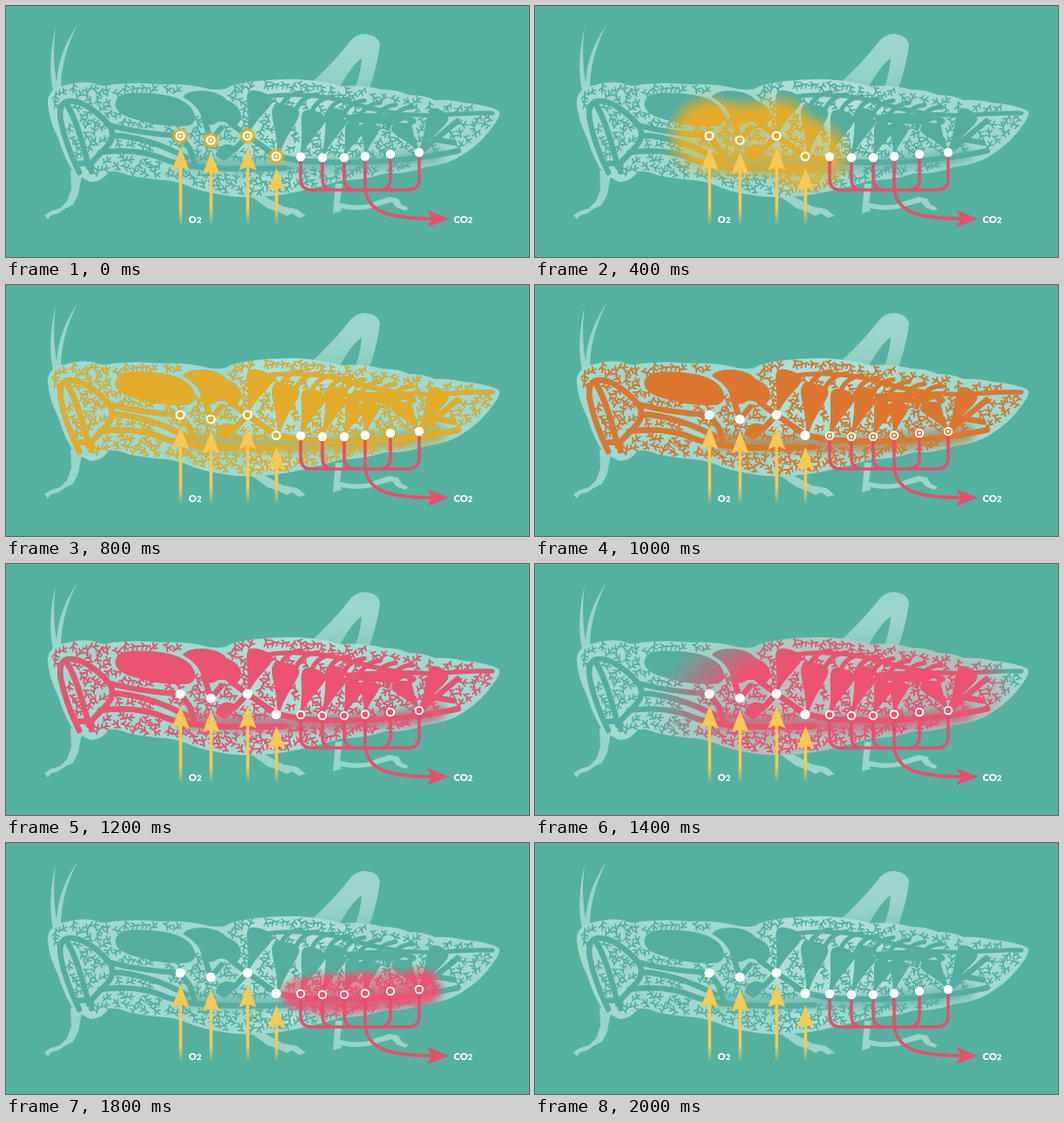
Write an HTML page that moves like this. It is 600 by 288 pixels and loops after 2100 ms.

```html
<!DOCTYPE html>
<html lang="en">
<head>
<meta charset="utf-8">
<title>Insect respiration</title>
<style>
html, body { margin: 0; width: 100%; height: 100%; overflow: hidden; background: #55b1a0; }
svg { display: block; }
text { font: 900 11.2px Lato, sans-serif; fill: #fff; }
tspan { font-size: 9.6px; }
#net { stroke-linecap: round; stroke-linejoin: round; }
#band { filter: blur(4px); }
</style>
</head>
<body>
<svg id="stage" width="600" height="288" viewBox="0 0 600 288">
  <defs>
    <radialGradient id="soft">
      <stop offset=".6" stop-color="#fff"/>
      <stop offset="1" stop-color="#fff" stop-opacity="0"/>
    </radialGradient>
    <linearGradient id="shaft" gradientUnits="userSpaceOnUse" x1="0" y1="232" x2="0" y2="250">
      <stop stop-color="#f8c953"/>
      <stop offset="1" stop-color="#f8c953" stop-opacity=".15"/>
    </linearGradient>
    <linearGradient id="thigh" gradientUnits="userSpaceOnUse" x1="0" y1="60" x2="0" y2="128">
      <stop stop-color="#9bd6cc"/>
      <stop offset="1" stop-color="#bfe7df" stop-opacity=".15"/>
    </linearGradient>
    <mask id="spread" maskUnits="userSpaceOnUse" x="0" y="0" width="600" height="288"></mask>
    <clipPath id="inBody"><use href="#body"/></clipPath>
  </defs>

  <g fill="#99d5ca">
    <path d="M54 98Q47 66 57 24Q52 64 60 96ZM58 96Q57 58 82 21Q63 60 63 94Z"/>
    <path d="M74 188L87 194L83 216L77 228L67 233L60 238L52 240L48 245L44 240L52 235L62 232L70 224L75 210Z"/>
    <path d="M278 216L294 217L318 230L334 233L344 241L336 243L328 238L322 241L312 236L300 232Z"/>
    <path d="M378 204L386 204L383 226Q410 232 424 224L440 219L450 221L454 228L462 232L458 235L448 231L443 225L428 229Q410 237 384 232L385 235L375 238Z"/>
  </g>
  <path id="body" fill="#a0d9ce" d="M48 112C47 101 55 92 68 91C80 87 95 86 105 90Q112 93 122 90Q150 87 178 90Q210 89 232 95Q250 98 257 92Q285 83 335 84Q365 86 385 92Q410 90 432 96Q450 96 462 102Q480 102 492 108Q510 107 525 111Q550 113 565 120Q569 124 560 136Q546 157 525 170Q508 182 480 185Q460 193 435 192Q410 200 385 200Q360 208 335 213Q300 221 266 219Q235 216 215 209Q200 202 184 200Q158 198 140 194Q128 189 118 190Q110 202 97 202Q84 196 78 191Q68 178 60 152Q49 130 48 112Z"/>
  <path d="M270 91Q335 77 388 94Q425 120 410 165Q350 211 285 214Q258 170 270 91Z" fill="#d8f2ec" opacity=".22"/>
  <path d="M346 92Q375 66 392 44Q400 32 412 32Q428 34 429 45Q424 84 403 128L387 124Q407 86 408 60Q399 66 388 84L372 112L350 116Z" fill="url(#thigh)"/>

  <g color="#55ada0">
    <g id="net">
      <path id="band" d="M205 180Q300 186 390 181T495 170" fill="none" stroke="currentColor" stroke-width="17" opacity=".6"/>
      <path id="tubes" fill="none" stroke="currentColor" stroke-width="6.5" d="M84 191Q68 158 63 132Q59 109 74 109Q92 109 116 134Q128 147 116 161L98 180L80 181M70 113Q83 135 95 185M116 136Q150 146 200 149M122 148Q165 151 207 174M108 168Q150 162 182 176T320 186M98 180L98 190M200 149L211 164L216 180M235 154L228 132M235 154L247 140M277 149L258 135M277 149L310 172M277 149L262 165M310 172L338 178Q440 184 519 166M477 166L518 132M491 153L514 157"/>
      <path id="arches" fill="none" stroke="currentColor" stroke-width="5"/>
      <path id="sacs" fill="currentColor" stroke="currentColor" stroke-width="3"/>
      <path id="twigs" fill="none" stroke="currentColor" stroke-width="1.7"/>
    </g>
  </g>
  <g id="flow" mask="url(#spread)">
    <rect id="halo" width="600" height="288" fill="currentColor" clip-path="url(#inBody)"/>
    <use href="#net"/>
  </g>

  <g id="arrows" fill="#f8c953"></g>
  <g fill="none" stroke="#e84d6d" stroke-width="3.6">
    <path d="M338 174V198Q338 211 351 211H461Q474 211 474 198V168M363 174V198Q363 211 376 211M388 174V198Q388 211 401 211M441 170V198Q441 211 428 211M412 174V205C412 235 435 244 491 244"/>
    <path d="M508 244L483 234L489 244L483 254Z" fill="#e84d6d" stroke="none"/>
  </g>
  <g id="pores"></g>
  <text x="209.5" y="248.5">O<tspan>2</tspan></text>
  <text x="513.5" y="248.5">CO<tspan>2</tspan></text>
</svg>
<script>
const $ = id => document.getElementById(id);
const inlets = [[200, 149], [235, 154], [277, 149], [310, 172.5]];
const outlets = [[338, 173], [363, 174], [388, 174], [412, 172.5], [441, 170], [474, 168]];

function add(parent, tag, attrs) {
  const el = document.createElementNS('http://www.w3.org/2000/svg', tag);
  for (const k in attrs) el.setAttribute(k, attrs[k]);
  return $(parent).appendChild(el);
}

let seed = 7;
function random() {
  seed = (seed * 16807) % 2147483647;
  return seed / 2147483647;
}

// Air sac with a thin neck at (x, y) and a round top at (px, py)
function drop([x, y, px, py, w]) {
  const dx = px - x, dy = py - y, len = Math.hypot(dx, dy);
  const nx = -dy / len * w, ny = dx / len * w;
  const neck = s => `${x + dx * .6 + nx * s * .1} ${y + dy * .6 + ny * s * .1}`;
  const top = s => `${px + nx * s * 2.1} ${py + ny * s * 2.1}`;
  return `M${x} ${y}C${neck(1)} ${top(1)} ${px} ${py}C${top(-1)} ${neck(-1)} ${x} ${y}Z`;
}

$('sacs').setAttribute('d', 'M127 114Q126 101 150 101Q195 101 210 116Q222 132 208 136Q180 138 150 129Q129 124 127 114Z' +
  'M205 104Q210 98 230 99Q246 101 252 109Q268 116 268 125Q268 136 259 136Q250 129 242 132Q234 138 226 132Q226 116 205 104Z' +
  'M242 171Q247 156 261 162Q261 171 250 176Z' +
  'M372 131Q410 119 466 129Q474 133 462 136Q410 132 372 131Z' +
  [[277, 147, 293, 100, 14], [312, 172, 322, 115, 15], [338, 172, 355, 122, 13], [363, 172, 383, 120, 12],
   [388, 172, 402, 136, 10], [412, 170, 418, 136, 10], [474, 167, 450, 133, 11], [474, 168, 499, 121, 11]].map(drop).join(''));

let arches = 'M292 105Q345 96 398 112T500 125T558 123';
for (let i = 0; i < 8; i++) {
  const x = 312 + i * 18, y = 99 + i * 2.4;
  arches += `M${x} ${y + 25}Q${x + 6} ${y + 2} ${x + 27} ${y}`;
}
$('arches').setAttribute('d', arches);

// Fine branches fill the tissue that the large vessels leave free
function growTwigs() {
  const solid = [['tubes', 13], ['arches', 11], ['sacs', 9], ['band', 10], ['body', 11]].map(([id, gap]) => {
    const el = $(id);
    el.style.strokeWidth = gap;
    return el;
  });
  const p = $('stage').createSVGPoint(), spots = [];
  let d = '';
  for (let i = 0; i < 9000; i++) {
    p.x = 48 + random() * 520;
    p.y = 84 + random() * 136;
    const { x, y } = p;
    if (spots.some(s => Math.hypot(s[0] - x, s[1] - y) < 8)) continue;
    if (!$('body').isPointInFill(p) || $('sacs').isPointInFill(p) || solid.some(el => el.isPointInStroke(p))) continue;
    spots.push([x, y]);
    const a = random() * 6.28;
    const at = (r, turn) => `${(x + r * Math.cos(a + turn)).toFixed(1)} ${(y + r * Math.sin(a + turn)).toFixed(1)}`;
    d += `M${at(-5.5, 0)}L${at(5.5, 0)}M${at(-1, 0)}L${at(4.5, .95)}M${at(1, 0)}L${at(5, -.9)}M${at(-4, 0)}L${at(4.5, -2)}`;
  }
  $('twigs').setAttribute('d', d);
  solid.forEach(el => el.style.strokeWidth = '');
}
growTwigs();

for (const [x, y] of inlets) {
  const tip = y + 13.5;
  add('arrows', 'rect', { x: x - 1.5, y: tip + 18, width: 3.6, height: 232 - tip, fill: 'url(#shaft)' });
  add('arrows', 'path', { d: `M${x + .3} ${tip}l-10 26l10 -4l10 4z` });
}

const pores = [...inlets, ...outlets].map(([cx, cy], i) => {
  const dot = (r, fill) => add('pores', 'circle', { cx, cy, r, fill });
  dot(i < 4 ? 5.6 : 5.2, '#fff');
  return { hole: dot(3.3, 'currentColor'), lid: dot(1.7, '#fff'), start: i < 4 ? 0 : 10 };
});
const spots = [...inlets, ...outlets].map(([cx, cy]) => add('spread', 'ellipse', { cx, cy, fill: 'url(#soft)' }));

const yellow = [226, 172, 42], orange = [220, 118, 47], pink = [236, 82, 113];
const clamp = v => Math.max(0, Math.min(1, v));
const mix = (a, b, k) => `rgb(${a.map((v, i) => v + (b[i] - v) * k)})`;

function draw(n) {
  const filling = n <= 10, left = 20 - n;
  const color = filling ? mix(yellow, orange, clamp((n - 8) / 2)) : mix(orange, pink, clamp((n - 10) / 2));
  $('flow').style.color = $('pores').style.color = color;
  $('halo').style.opacity = .8 * clamp(filling ? 1 - n / 8 : (n - 12) / 8);

  // The outermost pore on each side stretches along the body
  spots.forEach((el, i) => {
    const inlet = i < 4;
    let r = inlet ? 11 + .64 * n ** 3 : 4 + 13 * left, stretch = 1;
    if (i === 3) stretch += n / 40;
    if (i === 4) {
      r = 4 + 8 * left + .35 * left ** 3;
      stretch += left / 10;
    }
    el.setAttribute('rx', r * stretch);
    el.setAttribute('ry', r);
    el.style.display = inlet === filling && n < 20 ? '' : 'none';
  });

  for (const { hole, lid, start } of pores) {
    const k = n - start;
    hole.style.display = k >= 0 && k <= 9 ? '' : 'none';
    lid.style.display = k === 0 || k === 9 ? '' : 'none';
  }
}

const begin = performance.now();
function tick() {
  draw(Math.floor((performance.now() - begin) / 100) % 21);
  requestAnimationFrame(tick);
}
tick();
</script>
</body>
</html>
```
